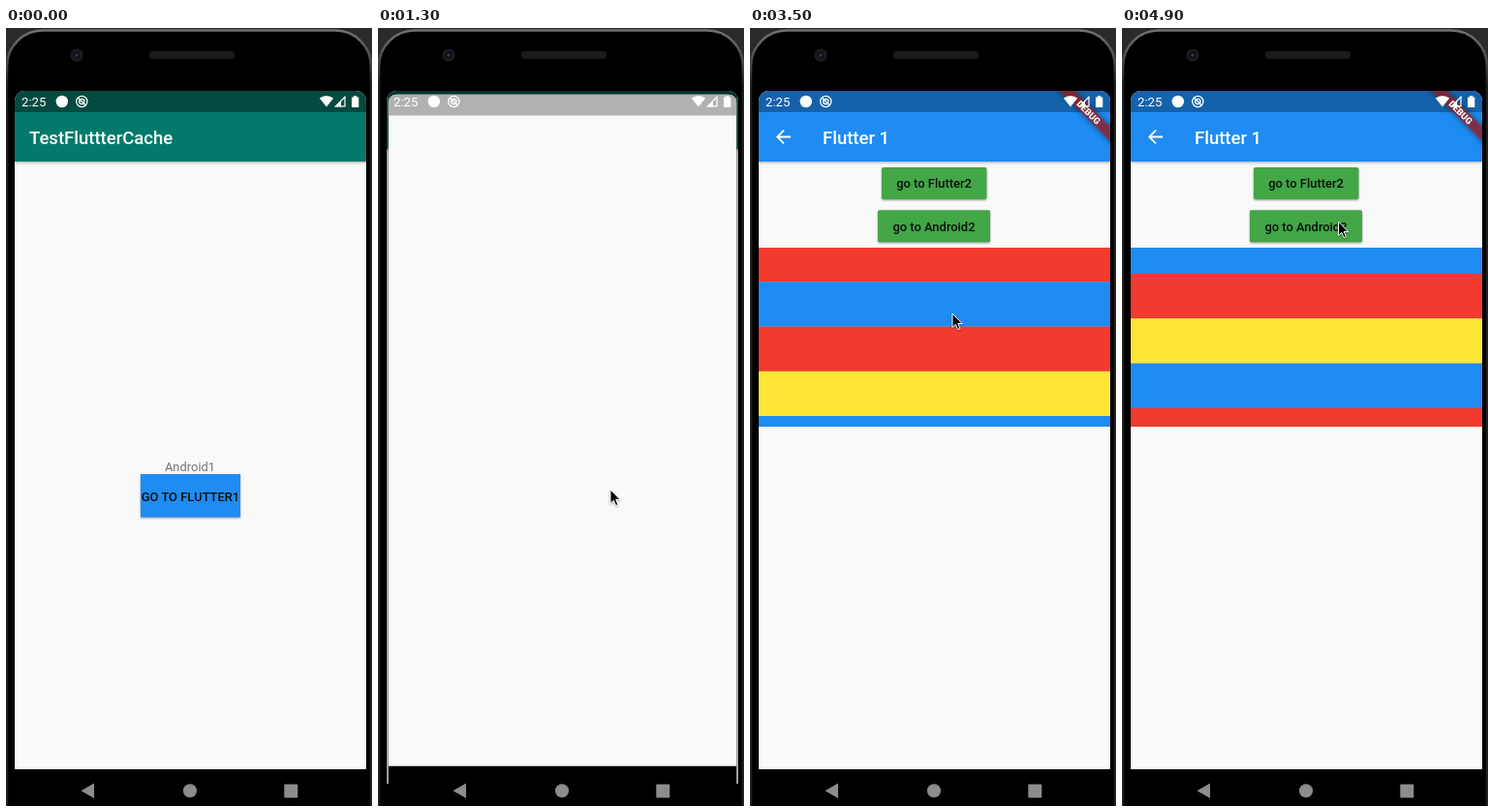
An HTML page for the animation above (5000 ms loop, 378x804 px).

```html
<!DOCTYPE html>
<html lang="en">
<head>
<meta charset="utf-8">
<title>Cached screen demo</title>
<style>
  html, body { margin: 0; width: 100%; height: 100%; overflow: hidden; background: #000; }
  svg { display: block; width: 100%; height: 100%; }
  text { font-family: Roboto, sans-serif; font-size: 12.94px; }
  .title { font-size: 18.5px; font-weight: 500; fill: #fff; }
  .label { font-weight: 500; text-anchor: middle; fill: #0b0f0b; }
  .raised { filter: drop-shadow(0 1.2px 1.2px #0006); }
  .pressed { filter: drop-shadow(0 2.5px 2.5px #0007); }
  .bar { filter: drop-shadow(0 1.5px 1.5px #0005); }
  .cursor { filter: drop-shadow(0 1px 1px #0005); }
</style>
</head>
<body>
<svg viewBox="0 0 378 804">
  <defs>
    <clipPath id="screen"><path d="M9 804V75a10 10 0 0 1 10-10H362a10 10 0 0 1 10 10V804z"/></clipPath>
    <clipPath id="listClip"><rect x="9" y="227" width="363" height="185"/></clipPath>
    <linearGradient id="rim" x1="0" y1="0" x2="0" y2="60" gradientUnits="userSpaceOnUse">
      <stop offset="0" stop-color="#747474"/>
      <stop offset=".5" stop-color="#505050"/>
      <stop offset="1" stop-color="#1f1f1f"/>
    </linearGradient>
  </defs>

  <!-- phone body -->
  <rect width="378" height="804" fill="#2a2a2a"/>
  <rect x="1" y="2.5" width="376" height="860" rx="37" fill="#000" stroke="url(#rim)" stroke-width="2.6"/>
  <circle cx="73" cy="28" r="6.6" fill="#1d1d1f"/>
  <circle cx="73" cy="28" r="4" fill="#101218"/>
  <circle cx="73" cy="28" r="1.6" fill="#2d3c58"/>
  <rect x="148" y="24" width="88" height="8" rx="3.5" fill="#1b1b1b"/>

  <g clip-path="url(#screen)">
    <g id="home">
      <rect x="9" y="65" width="363" height="701" fill="#f9f9f9"/>
      <rect class="bar" x="9" y="86" width="363" height="52" fill="#027a6b"/>
      <rect x="9" y="65" width="363" height="22" fill="#044a40"/>
      <text class="title" x="24" y="119.5">TestFluttterCache</text>
      <text x="190" y="458" text-anchor="middle" fill="#757575">Android1</text>
      <rect id="go" class="raised" x="139" y="461" width="103" height="44.5" fill="#1e8cf2"/>
      <text class="label" x="190.5" y="488.5">GO TO FLUTTER1</text>
      <rect id="dim" x="9" y="65" width="363" height="701" fill="#000" opacity="0"/>
    </g>

    <g id="blank">
      <rect x="9" y="65" width="363" height="739" rx="8" fill="#000"/>
      <path d="M9 766V73a8 8 0 0 1 8-8H364a8 8 0 0 1 8 8V766z" fill="#f9f9f9"/>
      <path d="M9 87V73a8 8 0 0 1 8-8H364a8 8 0 0 1 8 8V87z" fill="#b1b1b1"/>
    </g>

    <g id="flutter">
      <rect x="9" y="65" width="363" height="701" fill="#f9f9f9"/>
      <rect class="bar" x="9" y="86" width="363" height="52" fill="#1e8cf2"/>
      <rect x="9" y="65" width="363" height="22" fill="#1562ab"/>
      <path d="M42 112.5H28.5M35 105.7L28.2 112.5L35 119.3" fill="none" stroke="#fff" stroke-width="1.8"/>
      <text class="title" x="75" y="119.5">Flutter 1</text>
      <rect class="raised" x="136" y="144" width="108.4" height="33" rx="1.8" fill="#43a647"/>
      <text class="label" x="190" y="165">go to Flutter2</text>
      <rect class="raised" x="132" y="188.3" width="116" height="33" rx="1.8" fill="#43a647"/>
      <text class="label" x="190" y="209.5">go to Android2</text>
      <g clip-path="url(#listClip)"><g id="rows"></g></g>
      <g transform="translate(372 65) rotate(45)">
        <rect x="-45" y="25.9" width="90" height="11.1" fill="#b71c1c" fill-opacity=".63" style="filter:drop-shadow(0 0 3px #000b)"/>
        <text y="34.8" text-anchor="middle" fill="#fff" style="font-size:9.4px;font-weight:900">DEBUG</text>
      </g>
    </g>
  </g>

  <!-- status and navigation icons -->
  <g fill="#fff">
    <text x="16" y="80.5" style="font-size:13.2px">2:25</text>
    <circle cx="57.8" cy="76" r="6.2"/>
    <g fill="none" stroke="#fff" stroke-width="1.3">
      <circle cx="78.3" cy="76" r="5.6"/>
      <circle cx="78.3" cy="76" r="2.6"/>
      <path d="M74.6 72.2L82 79.8"/>
    </g>
    <path d="M323.8 72.6Q331 67.6 338.2 72.6L331 81.6z"/>
    <path d="M340.5 80.8L350 71.3V80.8z" fill="none" stroke="#fff" stroke-width="1.2"/>
    <path d="M339.5 81.3L346 74.8V81.3z"/>
    <path d="M357 71.5H359V70H362.3V71.5H364.3V82H357z"/>
  </g>
  <g fill="#8d8d8d">
    <path d="M77.5 788.3L91 780.6V796z"/>
    <circle cx="190" cy="788.3" r="7"/>
    <rect x="287.3" y="781.5" width="14" height="14" rx="1"/>
  </g>

  <path id="cursor" class="cursor" d="M0 0V14.4L3.3 11.3L5.7 16.6L8 15.6L5.7 10.5H10.2z" fill="#000" stroke="#fff" stroke-width="1"/>
</svg>

<script>
const LOOP = 5000, STEP = 100;
const ROW = 46.25, LIST_TOP = 227, MAX_SCROLL = 65.5, DRAG_START = 306;
const COLORS = { red: '#f23a2e', blue: '#1e8cf2', yellow: '#fee734' };
const ROWS = ['red', 'blue', 'red', 'yellow', 'blue', 'red'];

// time, x, y of the pointer tip
const POINTER = [
  [100, 250, 2], [300, 246, 250], [600, 240, 494], [800, 232, 488], [1100, 226, 483.5],
  [1200, 233, 480], [1300, 240, 477], [2100, 240, 477], [2700, 212, 320], [2900, 212, 320],
  [3500, 209, 295], [4000, 209, 240], [4200, 210, 224], [4700, 229, 180], [4900, 223.5, 200]
];
// time, scale of the leaving screen, scale of the entering screen
const OPENING = [[1100, 1, .85], [1200, 1.04, .968], [1300, 1.0446, .99], [1400, 1.05, .999], [1500, 1.05, 1]];

const $ = id => document.getElementById(id);
const [home, blank, flutter, rows, go, dim, cursor] =
  ['home', 'blank', 'flutter', 'rows', 'go', 'dim', 'cursor'].map($);

ROWS.forEach((name, i) => {
  const r = document.createElementNS('http://www.w3.org/2000/svg', 'rect');
  const attrs = { x: 9, y: LIST_TOP + i * ROW, width: 363, height: ROW + .3, fill: COLORS[name] };
  for (const key in attrs) r.setAttribute(key, attrs[key]);
  rows.append(r);
});

function sample(keys, t) {
  const i = keys.findIndex(k => k[0] >= t);
  if (i < 0) return keys[keys.length - 1].slice(1);
  if (i === 0) return keys[0].slice(1);
  const a = keys[i - 1], b = keys[i], p = (t - a[0]) / (b[0] - a[0]);
  return a.slice(1).map((v, n) => v + (b[n + 1] - v) * p);
}

const show = (el, on) => { el.style.display = on ? '' : 'none'; };
const zoom = (el, s) =>
  el.setAttribute('transform', `translate(190.5 429) scale(${s}) translate(-190.5 -429)`);

function draw(t) {
  const [x, y] = sample(POINTER, t);
  show(cursor, t >= 100);
  cursor.setAttribute('transform', `translate(${x} ${y})`);

  const [leave, enter] = sample(OPENING, t);
  const opening = t >= 1200;
  show(home, t < 1500);
  show(blank, opening && t < 1800);
  show(flutter, t >= 1800);
  zoom(home, leave);
  zoom(blank, enter);
  dim.setAttribute('opacity', opening ? .3 : 0);
  go.setAttribute('class', t >= 1000 ? 'pressed' : 'raised');

  const scroll = Math.max(0, Math.min(MAX_SCROLL, DRAG_START - y));
  rows.setAttribute('transform', `translate(0 ${-scroll})`);
}

const start = performance.now();
function tick() {
  const t = (performance.now() - start) % LOOP;
  draw(Math.floor(t / STEP) * STEP);
  requestAnimationFrame(tick);
}
tick();
</script>
</body>
</html>
```
